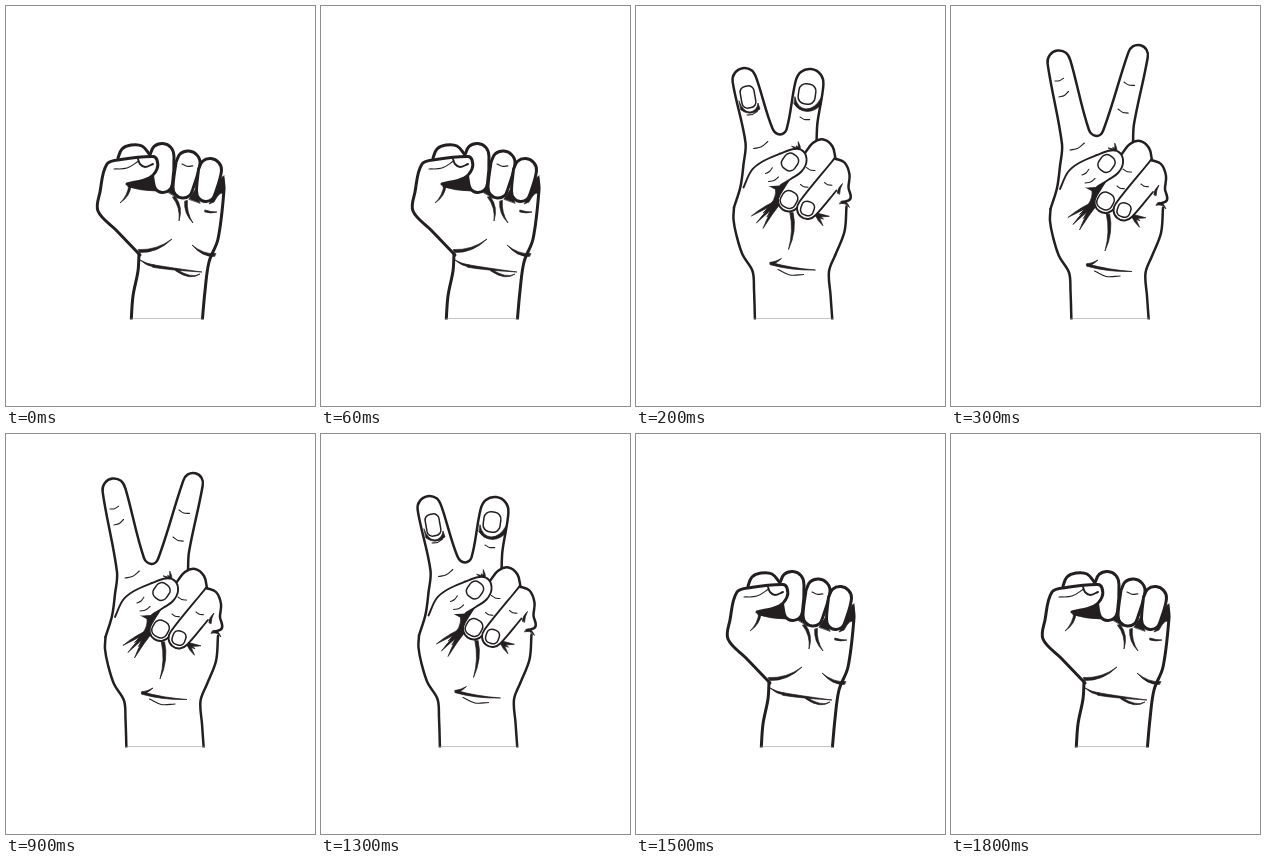
Animation, 309 px wide and 400 px high, one loop 2000 ms. Source, as an HTML page:

```html
<!DOCTYPE html>
<html lang="en">
<head>
<meta charset="utf-8">
<title>Hand sign</title>
<style>
html, body { margin: 0; width: 100%; height: 100%; overflow: hidden; background: #fff; }
svg { display: block; width: 100%; height: 100%; }
path, rect { fill: none; stroke: #231f20; stroke-linecap: round; stroke-linejoin: round; }
.skin { fill: #fff; }
.ink { fill: #231f20; stroke-width: .7; }
.hem { stroke: #888; stroke-width: .5; }
</style>
</head>
<body>
<svg id="stage" viewBox="0 0 309 400">
  <clipPath id="cuff"><path d="M0,0H309V313.6H0Z"/></clipPath>
</svg>
<script>
const stage = document.getElementById('stage');
const THIN = 1.1, INNER = 1.9, LINE = 2.5, BOLD = 3;
const RAD = Math.PI / 180;

function node(tag, attrs, parent) {
  const el = document.createElementNS('http://www.w3.org/2000/svg', tag);
  for (const key in attrs) el.setAttribute(key, attrs[key]);
  return parent.appendChild(el);
}

// "x,y x,y ..." to points
const pts = text => text.split(' ').map(s => s.split(',').map(Number));

// Point at a distance and a heading; 0 is up, clockwise
const polar = (x, y, r, deg) => [x + r * Math.sin(deg * RAD), y - r * Math.cos(deg * RAD)];

// Half circle around a fingertip that points along the heading
const tip = (x, y, r, heading) =>
  [-90, -45, 0, 45, 90].map(a => polar(x, y, r, heading + a));

// Smooth path; handles follow the length of each segment
function smooth(p) {
  const at = i => p[Math.max(0, Math.min(p.length - 1, i))];
  const handle = (i, reach) => {
    const [a, b, c] = [at(i - 1), at(i), at(i + 1)];
    const dx = c[0] - a[0], dy = c[1] - a[1], k = reach / Math.hypot(dx, dy);
    return [b[0] + dx * k, b[1] + dy * k];
  };
  let d = 'M' + p[0];
  for (let i = 0; i < p.length - 1; i++) {
    const reach = Math.hypot(p[i + 1][0] - p[i][0], p[i + 1][1] - p[i][1]) * .34;
    d += `C${handle(i, reach)} ${handle(i + 1, -reach)} ${p[i + 1]}`;
  }
  return d;
}

const line = (g, p, width = LINE) => node('path', { d: smooth(p), 'stroke-width': width }, g);
const skin = (g, p, width = INNER) =>
  node('path', { d: smooth(p), class: 'skin', 'stroke-width': width }, g);
const ink = (g, d) => node('path', { d, class: 'ink' }, g);

function nail(g, x, y, w, h, tilt) {
  node('rect', {
    x: x - w / 2, y: y - h / 2, width: w, height: h, rx: w * .4, class: 'skin',
    'stroke-width': 1.5, transform: `rotate(${tilt} ${x} ${y})`
  }, g);
}

// Short bent skin line
function fold(g, x, y, length, heading) {
  const end = polar(x, y, length, heading), mid = polar(x, y, length / 2, heading + 14);
  line(g, [[x, y], mid, end], THIN);
}

// Crease that is wide at its start and runs out to a point
function crease(g, x1, y1, cx, cy, x2, y2, w) {
  const k = w / 2 / Math.hypot(x2 - x1, y2 - y1);
  const ox = (y1 - y2) * k, oy = (x2 - x1) * k;
  ink(g, `M${x1 + ox},${y1 + oy}Q${cx + ox},${cy + oy} ${x2},${y2}` +
         `Q${cx - ox},${cy - oy} ${x1 - ox},${y1 - oy}Z`);
}

// Creases spreading from one spot, long and short by turns
function fan(g, x, y, from, to, count, length, w) {
  for (let i = 0; i < count; i++) {
    const a = from + (to - from) * i / (count - 1), reach = length * (i % 2 ? .65 : 1);
    crease(g, x, y, ...polar(x, y, reach / 2, a + 6), ...polar(x, y, reach, a), w);
  }
}

const pose = () => node('g', { 'clip-path': 'url(#cuff)', visibility: 'hidden' }, stage);
const hem = (g, x1, x2) => node('path', { d: `M${x1},312.5H${x2}`, class: 'hem' }, g);

// Palm, thumb and the two folded fingers
function palm(parent, dx, dy) {
  const g = node('g', { transform: `translate(${dx} ${dy})` }, parent);
  line(g, pts('99.5,203 99,215 102,231 108,250 118,266.5 119.5,285 120.5,318'));
  line(g, pts('212,202 210,227 201,250 194.5,267 196,290 198,318'));

  // Shadow under the thumb and around the fingertips
  ink(g, 'M134,181Q147,182 158,175L149,185L144,196L137,199Q142,191 141,185Z');
  fan(g, 146, 196, -118, -148, 5, 33, 3.4);
  fan(g, 182, 210, 98, 150, 3, 13, 3);
  fan(g, 165, 146, -62, -8, 3, 9, 2.4);
  crease(g, 157, 208, 161, 226, 154, 245, 3.4);

  // Ring finger, little finger, thumb
  skin(g, pts('170,149 179,138 189,135 198,142 201,154'), LINE);
  skin(g, [[200, 154], ...tip(154.5, 196, 11, -146), [170, 152]]);
  line(g, pts('200,154 210,158 215,170 214,183 216,194 208,198'));
  skin(g, [[202, 186], ...tip(173, 204, 10.5, -140), [200, 154]]);
  skin(g, pts('109,183 117,166 128,157 146,149 160,144.5 169,147 172,157 167,167 157,174 146,181'));
  crease(g, 206, 198, 211, 196, 215, 203, 3);
  crease(g, 204, 189, 204, 184, 208, 179, 2.4);

  nail(g, 155.5, 157.5, 15, 17, 35);
  nail(g, 154.5, 195, 16, 17, 30);
  nail(g, 173, 204, 13, 14, 20);
  fold(g, 131, 169, 9, 50);
  fold(g, 134, 177, 11, 66);
  fold(g, 172, 163, 9, 110);
  fold(g, 166, 180, 8, 110);
  fold(g, 190, 178, 8, 110);

  // Wrist
  crease(g, 136, 259, 157, 265, 181, 265.5, 2.4);
  crease(g, 136, 259, 142, 258, 147, 254, 2);
  fold(g, 143.5, 265, 26, 101);
}

function fist() {
  const g = pose();
  line(g, pts('133,248 132,265 127,290 125,318'), BOLD);
  line(g, pts('217,172 218,184 212,233 203,256 199,285 196,318'), BOLD);
  ink(g, 'M120,177L147,169L150,185Q135,185 119,180Z');
  ink(g, 'M218,170V189Q215,183 208,196L203,198Q211,188 214,174Z');
  ink(g, 'M162,186L168,179L172,192ZM183,193L189,184L194,197Z');

  // Fingers: knuckle, fingertip and the radius of each
  skin(g, pts('112,152 116,143 125,139 136,140 144,149'), BOLD);
  for (const [x1, y1, r1, x2, y2, r2] of [
    [156, 149.5, 12, 157, 177, 9.5], [182, 157, 12, 177, 182, 10], [204, 164, 11.5, 200, 186, 9.5]
  ]) {
    const knuckle = tip(x1, y1, r1, 4);
    skin(g, [...knuckle, ...tip(x2, y2, r2, 184), knuckle[0]], BOLD);
  }
  skin(g, pts('134,249 110,224 92,205 94,186 101,158 115,153.5 147,150.5 151,154 151,163 143,172 121,178'), BOLD);

  // Nail and small folds
  line(g, pts('132,153 134,158 139,161 147,158'), INNER);
  fold(g, 108, 163, 26, 72);
  fold(g, 176, 158, 11, 100);
  crease(g, 124, 179, 123, 190, 114, 197, 2.4);
  crease(g, 168, 191, 176, 201, 173, 215, 2.8);
  crease(g, 180, 195, 179, 207, 187, 217, 2.8);
  crease(g, 199, 205, 205, 207, 211, 206, 1.8);
  crease(g, 133, 245, 151, 246, 166, 233, 3);
  crease(g, 209, 249, 197, 250, 186, 239, 3);

  // Wrist
  crease(g, 147, 260, 164, 263, 196, 266, 2.6);
  crease(g, 148, 260, 141, 259, 134, 254, 2);
  crease(g, 170, 264, 185, 274, 194, 268, 2);
  hem(g, 125, 196);
  return g;
}

function curled() {
  const g = pose();
  line(g, pts('103,206 104,190 113,164 115,142 115,132'));
  line(g, pts('136,136 144,142 150,147 154,141'), INNER);
  skin(g, [[122, 159], [117, 150], ...tip(125, 130, 11, -14), [142, 153], [133, 161], [122, 159]]);
  skin(g, [[154, 141], ...tip(170, 120.5, 12.5, 6), [179, 142], [167, 147], [154, 141]]);
  fan(g, 149, 151, -24, 20, 2, 11, 3);
  nail(g, 131, 148, 15, 21, -12);
  nail(g, 166.5, 132, 16, 21, 8);
  fold(g, 119, 128, 13, 60);
  fold(g, 164, 115, 16, 78);
  palm(g, 3.5, 2.2);
  return g;
}

// Two raised fingers, each given as a tip: x, y, radius, heading
function spread(left, right, dx, dy) {
  const g = pose();
  const shift = ([x, y]) => [x + dx, y + dy];
  line(g, [
    ...pts('99.5,203 106,182 109,160 111,138').map(shift), ...tip(...left),
    ...pts('138,124 145.5,130 152,125').map(shift), ...tip(...right),
    ...pts('183,118 182,137').map(shift)
  ]);
  fold(g, 119 + dx, 144 + dy, 16, 64);
  palm(g, dx, dy);
  hem(g, 120 + dx, 198 + dx);
  return g;
}

function halfway() {
  const g = spread([108.5, 74, 12, -9], [173.5, 77, 14, 7], -1.5, -1.5);
  ink(g, 'M103,95Q107,106 114,106Q121,105 122,97L124,103Q114,111 105,104Z');
  ink(g, 'M159,91Q161,102 170,103Q179,103 185,92L184,100Q176,107 168,105Q162,104 158,98Z');
  nail(g, 112, 91, 14, 22, -10);
  nail(g, 171, 88, 17, 20, 8);
  fold(g, 111, 109, 11, 70);
  fold(g, 164, 111, 10, 105);
  return g;
}

function victory() {
  const g = spread([108, 56, 11.5, -8], [187, 49, 10, 14], 0, 0);
  fold(g, 104, 75, 9, 72);
  fold(g, 108, 91, 11, 60);
  fold(g, 173, 76, 11, 108);
  fold(g, 167, 103, 11, 112);
  return g;
}

const [closed, bent, half, open] = [fist(), curled(), halfway(), victory()];
const steps = [[0, closed], [100, bent], [200, half], [300, open], [1300, half], [1400, bent], [1500, closed]];
const LOOP = 2000;
const start = performance.now();
let shown;

function draw() {
  const t = Math.max(0, performance.now() - start) % LOOP;
  const next = steps.filter(s => s[0] <= t).pop()[1];
  if (next !== shown) {
    if (shown) shown.setAttribute('visibility', 'hidden');
    next.setAttribute('visibility', 'visible');
    shown = next;
  }
  requestAnimationFrame(draw);
}
draw();
</script>
</body>
</html>
```
